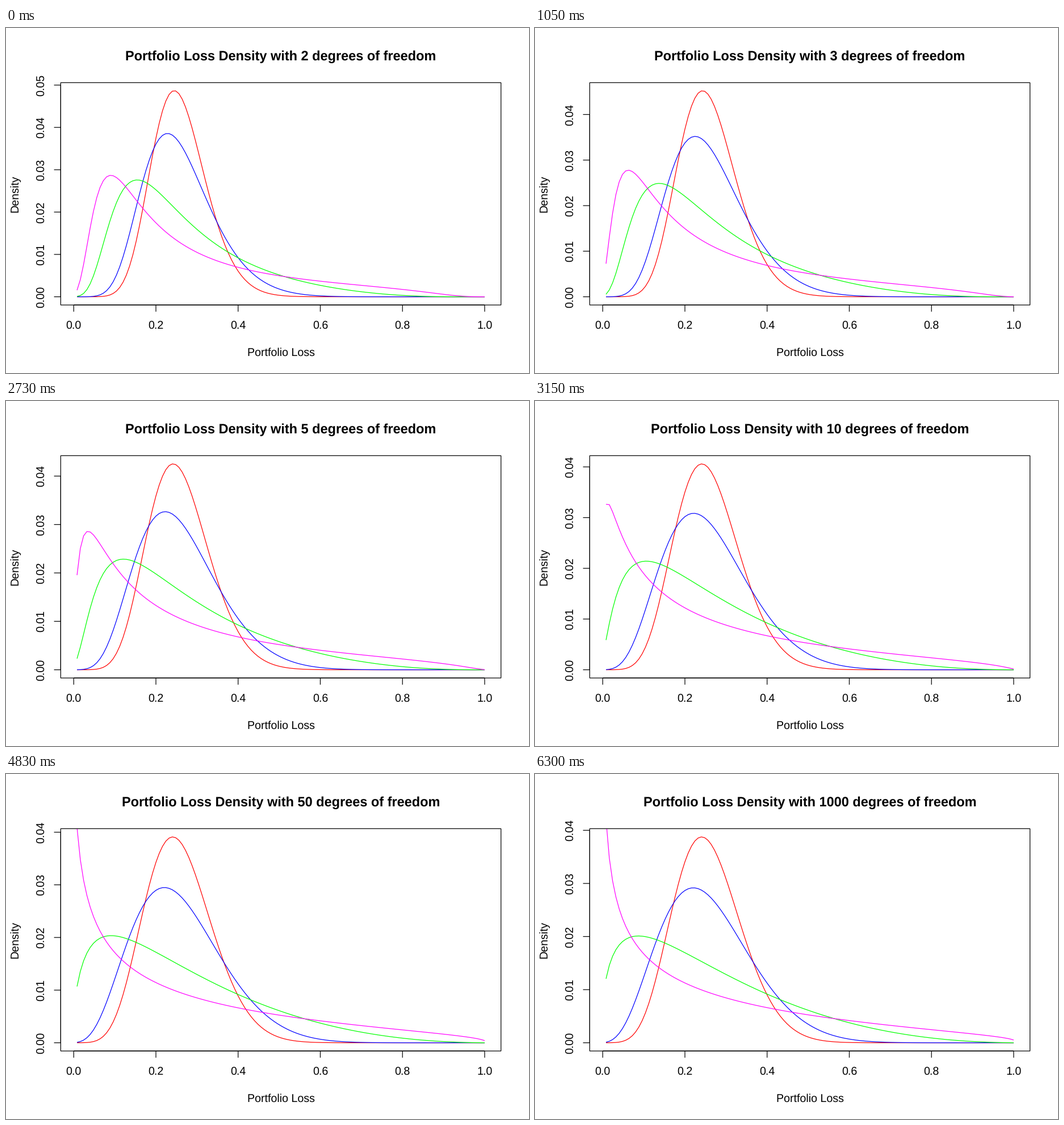
Write a matplotlib script that moves like this. It is 921 by 608 pixels and loops after 7350 ms.

```python
import math

import numpy as np
import matplotlib.pyplot as plt
from matplotlib.animation import FuncAnimation
from matplotlib.patches import Rectangle

plt.rcParams["font.family"] = "Liberation Sans"
plt.rcParams["text.hinting"] = "no_hinting"

W, H, DPI = 921, 608, 100
PX = 72 / DPI                       # points per pixel
LINE = 23.5                         # height of one margin line
LEFT, TOP = 4.1 * LINE, 4.1 * LINE
RIGHT, BOTTOM = W - 2.1 * LINE, H - 5.1 * LINE
STROKE = 1.22 * PX
FONT = 19.6 * PX

NAMES = 125                         # credits in the portfolio
P_DEFAULT = 1 - math.exp(-0.3)
DEGREES = [2, 3, 5, 10, 50, 200, 1000]
CURVES = [(0.05, "#ff0000"), (0.1, "#0000ff"), (0.3, "#00ff00"), (0.5, "#ff00ff")]

count = np.arange(1, NAMES + 1)
log_choose = np.array([math.lgamma(NAMES + 1) - math.lgamma(k + 1)
                       - math.lgamma(NAMES - k + 1) for k in count])
factor = np.linspace(-8, 8, 1201)
weight = np.exp(-factor ** 2 / 2)
weight /= weight.sum()


def student_table(df):
    """Student t distribution over the angle atan(z / sqrt(df))."""
    angle = np.linspace(-math.pi / 2, math.pi / 2, 60001)
    pdf = np.abs(np.cos(angle)) ** (df - 1)
    cdf = np.concatenate([[0], np.cumsum(pdf[1:] + pdf[:-1])])
    return angle, cdf / cdf[-1]


def loss_density(df, rho):
    """Binomial loss mixed over a normal factor, with Student t residuals."""
    angle, cdf = student_table(df)
    root = math.sqrt(df)
    barrier = root * math.tan(np.interp(P_DEFAULT, cdf, angle))
    z = (barrier - math.sqrt(rho) * factor) / math.sqrt(1 - rho)
    prob = np.interp(np.arctan(z / root), angle, cdf)
    prob = np.clip(prob, 1e-14, 1 - 1e-14)
    k = count[:, None]
    log_pmf = log_choose[:, None] + k * np.log(prob) + (NAMES - k) * np.log(1 - prob)
    return np.exp(log_pmf) @ weight


def x_px(x):
    lo, hi = 1 / NAMES, 1.0
    return LEFT + (RIGHT - LEFT) * (0.04 + (x - lo) / (hi - lo)) / 1.08


def y_px(y, peak):
    return BOTTOM - (BOTTOM - TOP) * (0.04 + y / peak) / 1.08


densities = [[loss_density(df, rho) for rho, _ in CURVES] for df in DEGREES]

fig = plt.figure(figsize=(W / DPI, H / DPI), dpi=DPI, facecolor="white")
ax = fig.add_axes([0, 0, 1, 1])
ax.set_xlim(0, W)
ax.set_ylim(H, 0)
ax.axis("off")


def stroke(xs, ys, color="black", z=3):
    return ax.plot(xs, ys, color=color, lw=STROKE, snap=False, zorder=z,
                   solid_capstyle="butt", solid_joinstyle="round")[0]


def label(x, y, text, turn=0, size=FONT, weight="normal"):
    return ax.text(x, y, text, rotation=turn, rotation_mode="anchor", ha="center",
                   va="baseline", fontsize=size, fontweight=weight, color="black")


frame = Rectangle((LEFT, TOP), RIGHT - LEFT, BOTTOM - TOP, fill=False,
                  ec="black", lw=STROKE, snap=False, zorder=4)
ax.add_patch(frame)

mid_x, mid_y = (LEFT + RIGHT) / 2, (TOP + BOTTOM) / 2
title = label(mid_x, 57.3, "", size=FONT * 1.2, weight="bold")
label(mid_x, BOTTOM + 3.8 * LINE, "Portfolio Loss")
label(LEFT - 3.2 * LINE, mid_y, "Density", turn=90)

stroke([x_px(0), x_px(1)], [BOTTOM, BOTTOM], z=4)
for i in range(6):
    x = x_px(i / 5)
    stroke([x, x], [BOTTOM, BOTTOM + LINE / 2])
    label(x, BOTTOM + 1.8 * LINE, f"{i / 5:.1f}")

y_axis = stroke([], [], z=4)
y_ticks = [(i / 100, stroke([], []), label(LEFT - 1.2 * LINE, 0, f"{i / 100:.2f}", turn=90))
           for i in range(6)]

lines = []
for rho, color in CURVES:
    line = stroke(x_px(count / NAMES), np.zeros(NAMES), color, z=2)
    line.set_clip_path(frame)
    lines.append(line)


def update(i):
    peak = densities[i][0].max()    # the first curve sets the scale
    title.set_text(f"Portfolio Loss Density with {DEGREES[i]} degrees of freedom")
    for line, density in zip(lines, densities[i]):
        line.set_ydata(y_px(density, peak))
    shown = []
    for value, tick, text in y_ticks:
        y = y_px(value, peak)
        inside = value <= peak * 1.04
        tick.set_data([LEFT - LINE / 2, LEFT], [y, y])
        text.set_y(y)
        tick.set_visible(inside)
        text.set_visible(inside)
        if inside:
            shown.append(y)
    y_axis.set_data([LEFT, LEFT], [shown[0], shown[-1]])
    return [title, y_axis, *lines]


anim = FuncAnimation(fig, update, frames=len(DEGREES), interval=1050,
                     repeat=True, repeat_delay=0, blit=False)
plt.show()
```
